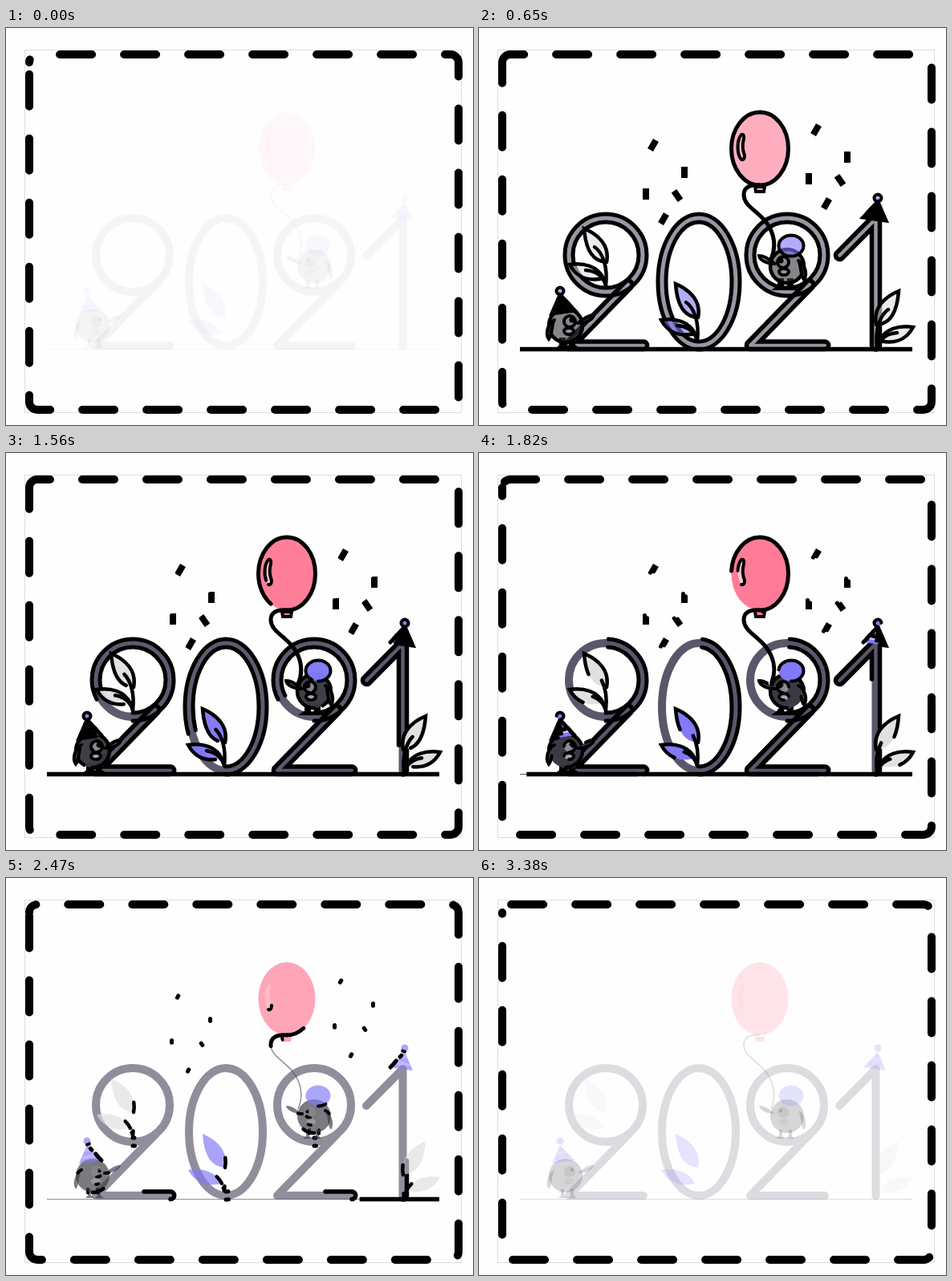
These frames come from a looping animation (582 px wide and 495 px high, 3510 ms). An HTML page:

```html
<!DOCTYPE html>
<html lang="en">
<head>
<meta charset="utf-8">
<title>2021</title>
<style>
  html, body { margin: 0; width: 100%; height: 100%; overflow: hidden; background: #fefefe; }
  svg { display: block; width: 582px; height: 495px; }
</style>
</head>
<body>
<svg id="stage" viewBox="0 0 582 495" fill="none"></svg>
<script>
const LOOP = 3510, STEP = 130;
const GREY = '#5c566b', DARK = '#3a3a42', LILAC = '#8279f7', PINK = '#ff7b97', PALE = '#e2e0e2';
const stage = document.getElementById('stage');
const outlines = [], fills = [], faded = [];

function add(parent, tag, attrs = {}) {
  const node = document.createElementNS('http://www.w3.org/2000/svg', tag);
  for (const name in attrs) node.setAttribute(name, attrs[name]);
  return parent.appendChild(node);
}

const group = (transform = '') => add(stage, 'g', { transform });

// mid and late: share of the outline left at travel 203 and 251
function shape(parent, d, fill = 'none', { width = 4.5, mid = .75, late = .1, cap = 'round' } = {}) {
  const node = add(parent, 'path', {
    d, fill, pathLength: 1, 'stroke-width': width, 'stroke-linecap': cap
  });
  outlines.push({ node, mid, late });
  if (fill !== 'none') fills.push(node);
}

function ellipse(x, y, rx, ry = rx) {
  const arc = `A${rx} ${ry} 0 0 1 `;
  return `M${x} ${y + ry}${arc}${x} ${y - ry}${arc}${x} ${y + ry}`;
}

function softGroup() {
  const node = group();
  faded.push(node);
  return node;
}

function ring(soft, x, y, rx, ry) {
  add(soft, 'ellipse', { cx: x, cy: y, rx, ry, stroke: GREY, 'stroke-width': 10 });
  for (const edge of [5, -5])
    shape(stage, ellipse(x, y, rx + edge, ry + edge), 'none', { width: 5, mid: .5, late: 0 });
}

function limb(soft, centre, outline, x = 0, mid = .75) {
  const place = `translate(${x} 0)`;
  add(soft, 'path', {
    d: centre, transform: place, stroke: GREY, 'stroke-width': 10,
    'stroke-linecap': 'round', 'stroke-linejoin': 'round'
  });
  shape(group(place), outline, 'none', { width: 5.5, mid });
}

function two(x) {
  const soft = softGroup();
  ring(soft, 158 + x, 283, 46, 46);
  limb(soft, 'M186 320L112 396H205',
    'M205 400.5H111Q106 399 108 393L182.4 316.5A5 5 0 0 1 189.6 323.5L124 391H205A4.75 4.75 0 0 1 205 400.5', x, 1);
}

function leaves(transform, fill) {
  const g = group(transform), thin = { width: 4.5 };
  shape(g, 'M159 292C142 291 133 278 131 250C150 258 163 272 159 292', fill, thin);
  shape(g, 'M155 312C138 316 122 312 113 295C130 292 148 297 155 312', fill, thin);
  shape(g, 'M144 273C153 279 161 296 158 321', 'none', thin);
  shape(g, 'M133 302C146 303 155 310 158 321', 'none', thin);
}

function hat(transform) {
  const g = group(transform), thick = { width: 5 };
  shape(g, 'M119 352L91 356L101 333Z', LILAC, thick);
  shape(g, 'M115 348L94 351L96 347L111 343Z', '#c9c4ff', thick);
  shape(g, 'M107 339L98 342L99 338L104 336Z', '#c9c4ff', thick);
  shape(g, ellipse(101, 328, 4.5), LILAC, { width: 4 });
}

function bird(transform) {
  const g = group(transform), thin = { width: 4 };
  for (const x of [104, 116])
    shape(g, `M${x - 2} 388H${x + 2}V396L${x + 6} 399H${x - 5}L${x - 2} 396Z`, DARK, thin);
  shape(g, ellipse(108, 371, 21), DARK);
  shape(g, 'M94 364C90 370 92 382 87 388C82 381 86 368 94 364', DARK, thin);
  shape(g, 'M123 368C129 363 137 357 143 358C142 364 133 368 123 368', DARK, thin);
  shape(g, ellipse(113, 366, 7), '#8d8b92', { width: 4 });
  shape(g, ellipse(116, 364, 2), '#222', { width: 3 });
  shape(g, ellipse(112, 378, 6, 4), '#aaa8ad', { width: 4 });
}

function confetti(x, y, angle) {
  const h = angle > 0 ? -4.5 : 4.5;
  shape(group(`translate(${x} ${y}) rotate(${angle})`),
    `M-1.5 ${-h}H1.5V${h}H-1.5Z`, 'none', { width: 5 });
}

// Frame
add(stage, 'rect', { x: 23.5, y: 27.5, width: 544, height: 452, stroke: '#ddd' });
const border = add(stage, 'path', {
  d: 'M29 43A10 10 0 0 1 39 33H554A10 10 0 0 1 564 43V466A10 10 0 0 1 554 476H39A10 10 0 0 1 29 466Z',
  stroke: '#000', 'stroke-width': 10, 'stroke-linecap': 'round', 'stroke-dasharray': '40 40'
});

// Ground and digits
add(softGroup(), 'path', { d: 'M51 400.5H540', stroke: GREY });
two(0);
ring(softGroup(), 274, 316.5, 46, 79.5);
two(226);
limb(softGroup(), 'M449 284L494.5 238V396',
  'M494.5 401A5 5 0 0 1 489.5 396V250L452.5 287.5A5 5 0 0 1 445.5 280.5L491 234.5Q499.5 231 499.5 240V396A5 5 0 0 1 494.5 401');
shape(stage, 'M51 400.5H540', 'none', { width: 5.5, mid: 1, late: .19, cap: 'butt' });

leaves('', PALE);
leaves('translate(114 69)', LILAC);
leaves('matrix(-1 0 0 1 654 78)', PALE);

// Balloon
const string = 'M364 288C371 272 368 255 357 241C345 227 330 221 330 208C330 199 337 195 350 196';
add(softGroup(), 'path', { d: string, stroke: GREY, 'stroke-width': 1.5 });
shape(stage, ellipse(350, 150.5, 35.5, 45.5), PINK, { width: 5, late: .08 });
shape(stage, 'M344 198H356L355 204H345Z', PINK, { width: 4 });
shape(stage, 'M327 164C321 157 321 140 327 133Q331 132 330 138Q327 149 331 159Q331 165 327 164', '#ffc4d0', { width: 4 });
shape(stage, string, 'none', { width: 5, mid: 1, late: .22 });

// Birds and hats
bird('');
hat('');
bird('matrix(-1 0 0 1 492 -74)');
shape(stage, ellipse(389, 271.5, 15.5, 13), LILAC, { width: 4 });
hat('matrix(-1 0 0 1 598 -116)');

for (const [x, y] of [[0, 0], [203, -19]])
  for (const [cx, cy, angle] of [[217, 146, 30], [256, 180, 0], [208, 207, 0], [247, 209, -35], [230, 238, 30]])
    confetti(cx + x, cy + y, angle);

function valueAt(t, keys) {
  const next = keys.findIndex(key => key[0] > t);
  if (next === 0) return keys[0][1];
  if (next < 0) return keys[keys.length - 1][1];
  const [t0, a] = keys[next - 1], [t1, b] = keys[next];
  return a + (b - a) * (t - t0) / (t1 - t0);
}

const OPACITY = [[0, .05], [260, .28], [650, .61], [1170, .88], [1430, .96], [1820, 1],
  [2080, .89], [2470, .665], [2990, .34], [3380, .2]];

// Dash travel over one loop: five dash periods, quick at both ends and slow in the middle
function travelAt(t) {
  const x = t / LOOP - .5;
  return 200 + 216 * x + 736 * x ** 3;
}

function render(t) {
  const alpha = valueAt(t, OPACITY), travel = travelAt(t);
  const drawn = Math.min(1, travel / 80);
  border.setAttribute('stroke-dashoffset', -43.7 - travel);
  for (const node of faded) node.setAttribute('opacity', alpha);
  for (const node of fills) node.setAttribute('fill-opacity', alpha);
  for (const { node, mid, late } of outlines) {
    const left = valueAt(travel, [[180, 1], [203, mid], [251, late], [260, 0]]);
    const whole = drawn === 1 && left === 1;
    node.setAttribute('stroke', drawn > 0 && left > 0 ? '#000' : 'none');
    node.setAttribute('stroke-dasharray', whole ? 'none' : `${Math.min(drawn, left)} 2`);
    node.setAttribute('stroke-dashoffset', left - 1);
  }
}

function tick() {
  const t = performance.now() % LOOP;
  render(Math.floor(t / STEP) * STEP);
  requestAnimationFrame(tick);
}
tick();
</script>
</body>
</html>
```
